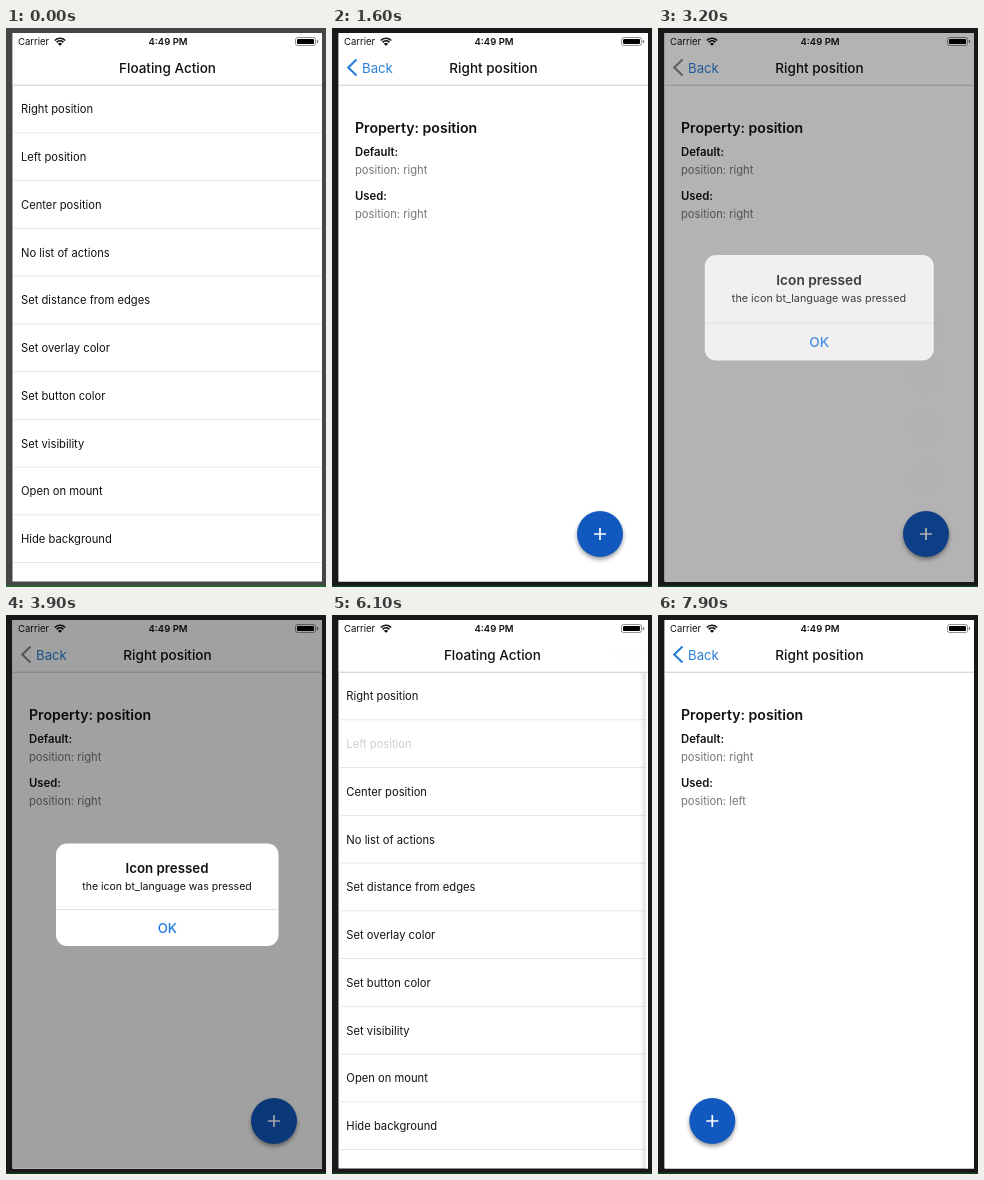
Recreate the animation shown at these times as an HTML page with a canvas. Size 320x559 px, loop 8000 ms.

```html
<!DOCTYPE html>
<html lang="en">
<head>
<meta charset="utf-8">
<title>Floating Action</title>
<style>
  html, body { margin: 0; width: 100%; height: 100%; overflow: hidden; background: #1a1718; }
  canvas { display: block; width: 320px; height: 559px; }
</style>
</head>
<body>
<canvas id="stage"></canvas>
<script>
const W = 320, H = 559, LOOP = 8000;
const SCREEN = { x: 6.5, y: 5, w: 309.5, h: 548.5 };
const HEADER_END = 57.5, ROW = 47.75;
const BLUE = '#1259bf', LINK = '#2b80d8';
const FONT = 'Inter, "Open Sans", sans-serif';

const rows = ['Right position', 'Left position', 'Center position', 'No list of actions',
  'Set distance from edges', 'Set overlay color', 'Set button color', 'Set visibility',
  'Open on mount', 'Hide background'];

// Bottom to top; icons live in a 24 x 24 box
const actions = [
  { label: 'Video', icon: new Path2D('M17 10.5V7c0-.55-.45-1-1-1H4c-.55 0-1 .45-1 1v10c0 .55.45 1 1 1h12c.55 0 1-.45 1-1v-3.5l4 4v-11l-4 4z') },
  { label: 'Location', icon: new Path2D('M12 2C8.13 2 5 5.13 5 9c0 5.25 7 13 7 13s7-7.75 7-13c0-3.87-3.13-7-7-7zm0 9.5a2.5 2.5 0 0 1 0-5 2.5 2.5 0 0 1 0 5z') },
  { label: 'Accessibility', icon: new Path2D('M12 2a2 2 0 0 1 0 4 2 2 0 0 1 0-4zM21 9h-6v13h-2v-6h-2v6H9V9H3V7h18v2z') },
  { label: 'Language', outline: true, icon: new Path2D('M21 12a9 9 0 0 1-18 0 9 9 0 0 1 18 0zM16 12a4 9 0 0 1-8 0 4 9 0 0 1 8 0zM4 9H20M4 15H20') }
];

const canvas = document.getElementById('stage');
const ctx = canvas.getContext('2d');
const dpr = window.devicePixelRatio || 1;
canvas.width = Math.round(W * dpr);
canvas.height = Math.round(H * dpr);

const clamp = v => Math.max(0, Math.min(1, v));
const ramp = (t, from, to) => clamp((t - from) / (to - from));
const smooth = v => v * v * (3 - 2 * v);

// cubic-bezier(.2833, .99, .3183, .99), solved by bisection
function slide(v) {
  if (v <= 0 || v >= 1) return clamp(v);
  const curve = (s, a, b) => 3 * (1 - s) * (1 - s) * s * a + 3 * (1 - s) * s * s * b + s * s * s;
  let lo = 0, hi = 1;
  for (let i = 0; i < 24; i++) {
    const mid = (lo + hi) / 2;
    if (curve(mid, 0.2833, 0.3183) < v) lo = mid; else hi = mid;
  }
  return curve(lo, 0.99, 0.99);
}

// Critically damped spring, time in ms
function spring(ms) {
  if (ms <= 0) return 0;
  const k = ms * 0.0187;
  return 1 - Math.exp(-k) * (1 + k);
}

function group(draw, alpha = 1, dx = 0, dy = 0) {
  if (alpha <= 0.002) return;
  ctx.save();
  ctx.globalAlpha *= alpha;
  ctx.translate(dx, dy);
  draw();
  ctx.restore();
}

function rect(x, y, w, h, color) {
  ctx.fillStyle = color;
  ctx.fillRect(x, y, w, h);
}

function text(str, x, y, size, { weight = 400, color = '#111', align = 'left' } = {}) {
  ctx.font = `${weight} ${size}px ${FONT}`;
  ctx.fillStyle = color;
  ctx.textAlign = align;
  ctx.fillText(str, x, y);
}

function stroke(points, color, width) {
  ctx.beginPath();
  points.forEach(([x, y]) => ctx.lineTo(x, y));
  ctx.strokeStyle = color;
  ctx.lineWidth = width;
  ctx.stroke();
}

function roundRect(x, y, w, h, r, color) {
  ctx.beginPath();
  ctx.roundRect(x, y, w, h, r);
  ctx.fillStyle = color;
  ctx.fill();
}

function disc(x, y, r, color) {
  ctx.beginPath();
  ctx.arc(x, y, r, 0, Math.PI * 2);
  ctx.fillStyle = color;
  ctx.fill();
}

function shadow(alpha, blur, dy) {
  ctx.shadowColor = `rgba(0,0,0,${alpha})`;
  ctx.shadowBlur = blur * dpr;
  ctx.shadowOffsetY = dy * dpr;
}

function drawStatus() {
  text('Carrier', 12, 17, 9.5);
  text('4:49 PM', 162, 17, 9.5, { weight: 600, align: 'center' });
  ctx.strokeStyle = '#111';
  ctx.lineWidth = 1.6;
  for (const r of [7.2, 4.6]) {
    ctx.beginPath();
    ctx.arc(54, 17.5, r, -Math.PI * 0.76, -Math.PI * 0.24);
    ctx.stroke();
  }
  ctx.beginPath();
  ctx.moveTo(54, 17.8);
  ctx.arc(54, 17.8, 2.8, -Math.PI * 0.76, -Math.PI * 0.24);
  ctx.fillStyle = '#111';
  ctx.fill();
  ctx.beginPath();
  ctx.roundRect(289.5, 9.5, 20, 8, 2);
  ctx.strokeStyle = '#777';
  ctx.lineWidth = 0.8;
  ctx.stroke();
  roundRect(291, 11, 17, 5, 1, '#000');
  roundRect(310.8, 12, 1.3, 3, 0.6, '#777');
}

function drawHeader(p, backAlpha, tint) {
  rect(SCREEN.x, SCREEN.y, SCREEN.w, HEADER_END - SCREEN.y, '#fff');
  rect(SCREEN.x, HEADER_END - 0.7, SCREEN.w, 0.7, '#b4b4b4');
  drawStatus();
  const title = (str, dx, alpha) => group(() =>
    text(str, 161.5, 44.5, 13.5, { weight: 500, align: 'center' }), alpha, dx);
  title('Floating Action', -165 * p, 1 - p);
  title('Right position', 165 * (1 - p), p);
  group(() => {
    stroke([[24.5, 31.5], [16.3, 39.5], [24.5, 47.5]], tint, 2.2);
    text('Back', 30, 44.5, 13.2, { color: LINK });
  }, p ** 3 * backAlpha);
}

function drawList(p, press) {
  group(() => {
    rows.forEach((label, i) => {
      const y = HEADER_END + ROW * i;
      group(() => text(label, 15, y + 27.8, 11.2), press[i] ?? 1);
      rect(SCREEN.x, y + ROW - 0.8, SCREEN.w + 100, 0.8, '#e2e2e2');
    });
  }, 1, -0.3 * SCREEN.w * p);
  rect(SCREEN.x, HEADER_END, SCREEN.w, H, `rgba(0,0,0,${0.13 * p})`);
}

function drawAction({ label, icon, outline }, x, y, left) {
  ctx.font = `400 11.2px ${FONT}`;
  const w = ctx.measureText(label).width + 14;
  const lx = left ? x + 28 : x - 28 - w;
  group(() => {
    shadow(0.4, 2.5, 2);
    roundRect(lx, y - 9.5, w, 18, 3, '#f3f3f3');
  });
  text(label, lx + 7, y + 3, 11.2, { color: '#5c5c5c' });
  group(() => {
    shadow(0.35, 3, 2);
    disc(x, y, 16.5, '#1a60c2');
  });
  ctx.save();
  ctx.translate(x - 8, y - 8);
  ctx.scale(2 / 3, 2 / 3);
  ctx.fillStyle = ctx.strokeStyle = '#fff';
  ctx.lineWidth = 1.8;
  if (outline) ctx.stroke(icon); else ctx.fill(icon, 'evenodd');
  ctx.restore();
}

function drawButton(x, y, m) {
  group(() => {
    shadow(0.4, 4, 2.5);
    disc(x, y, 23, BLUE);
  });
  ctx.save();
  ctx.translate(x, y);
  ctx.rotate(m * Math.PI / 4);
  stroke([[-6, 0], [6, 0]], '#fff', 1.7);
  stroke([[0, -6], [0, 6]], '#fff', 1.7);
  ctx.restore();
}

function drawPage(p, m, left) {
  if (p <= 0) return;
  group(() => {
    const x = SCREEN.x;
    if (p < 1) {
      const edge = ctx.createLinearGradient(x - 6, 0, x, 0);
      edge.addColorStop(0, 'rgba(0,0,0,0)');
      edge.addColorStop(1, 'rgba(0,0,0,.13)');
      rect(x - 6, HEADER_END, 6, H, edge);
    }
    rect(x, HEADER_END, SCREEN.w, H, '#fff');
    text('Property: position', 23, 105, 14.1, { weight: 600 });
    [['Default:', 'right', 127.5], ['Used:', left ? 'left' : 'right', 172]].forEach(([name, side, y]) => {
      text(name, 23, y, 11.3, { weight: 600 });
      text('position: ' + side, 23, y + 18, 11.2, { color: '#767676' });
    });
    rect(x, HEADER_END, SCREEN.w, H, `rgba(68,68,68,${0.6 * m})`);
    const bx = left ? 54.3 : 268;
    actions.forEach((action, i) => {
      const y = 506 - 56.7 - 3.6 * m - i * (50.3 + 3.6 * m);
      group(() => drawAction(action, bx, y, left), m);
    });
    drawButton(bx, 506, m);
  }, 1, (1 - p) * SCREEN.w);
}

function drawAlert(shown, scale, pressed) {
  group(() => {
    rect(SCREEN.x, SCREEN.y, SCREEN.w, SCREEN.h, 'rgba(0,0,0,.37)');
    ctx.translate(161, 280);
    ctx.scale(scale, scale);
    ctx.translate(-161, -280);
    roundRect(50, 228.5, 222.5, 102.5, 11, '#fff');
    if (pressed) roundRect(50, 295, 222.5, 36, [0, 0, 11, 11], '#e6e6e6');
    text('Icon pressed', 161, 258, 13.3, { weight: 600, align: 'center' });
    text('the icon bt_language was pressed', 161, 274.5, 10.5, { align: 'center' });
    rect(50, 294.3, 222.5, 0.8, '#d8d8d8');
    text('OK', 161.3, 318, 13.3, { weight: 500, color: '#1f78dc', align: 'center' });
  }, shown);
}

// Opacity of a touched item: dims, holds, then recovers
const touch = (t, down, up) =>
  1 - 0.8 * (ramp(t, down - 50, down + 80) - smooth(ramp(t, up, up + 250)));

function draw(t) {
  const p = slide((t - 800) / 500) - slide((t - 4850) / 500) + slide((t - 6100) / 500);
  const m = clamp(spring(t - 1900) - spring(t - 2800) + spring(t - 6885) - spring(t - 7300));
  const left = t > 5600;
  const enter = smooth(ramp(t, 2950, 3300));
  const shown = enter - smooth(ramp(t, 3920, 4300));

  ctx.setTransform(canvas.width / W, 0, 0, canvas.height / H, 0, 0);
  rect(0, 0, W, H, t < 500 ? '#474546' : '#1a1718');
  rect(0, H - 1.5, W, 1.5, t < 500 ? '#1f6b24' : '#10401a');

  ctx.save();
  ctx.beginPath();
  ctx.rect(SCREEN.x, SCREEN.y, SCREEN.w, SCREEN.h);
  ctx.clip();
  rect(0, 0, W, H, '#fff');
  if (p < 1) drawList(p, [touch(t, 550, 800), touch(t, 5900, 6100)]);
  drawPage(p, m, left);
  drawHeader(p, touch(t, 4800, 4850), shown > 0.3 ? '#8c8c8c' : LINK);
  drawAlert(shown, 1.15 - 0.15 * enter, t > 3700 && t < 3850);
  ctx.restore();
}

const start = performance.now();
function tick() {
  draw((performance.now() - start) % LOOP);
  requestAnimationFrame(tick);
}
tick();
</script>
</body>
</html>
```
